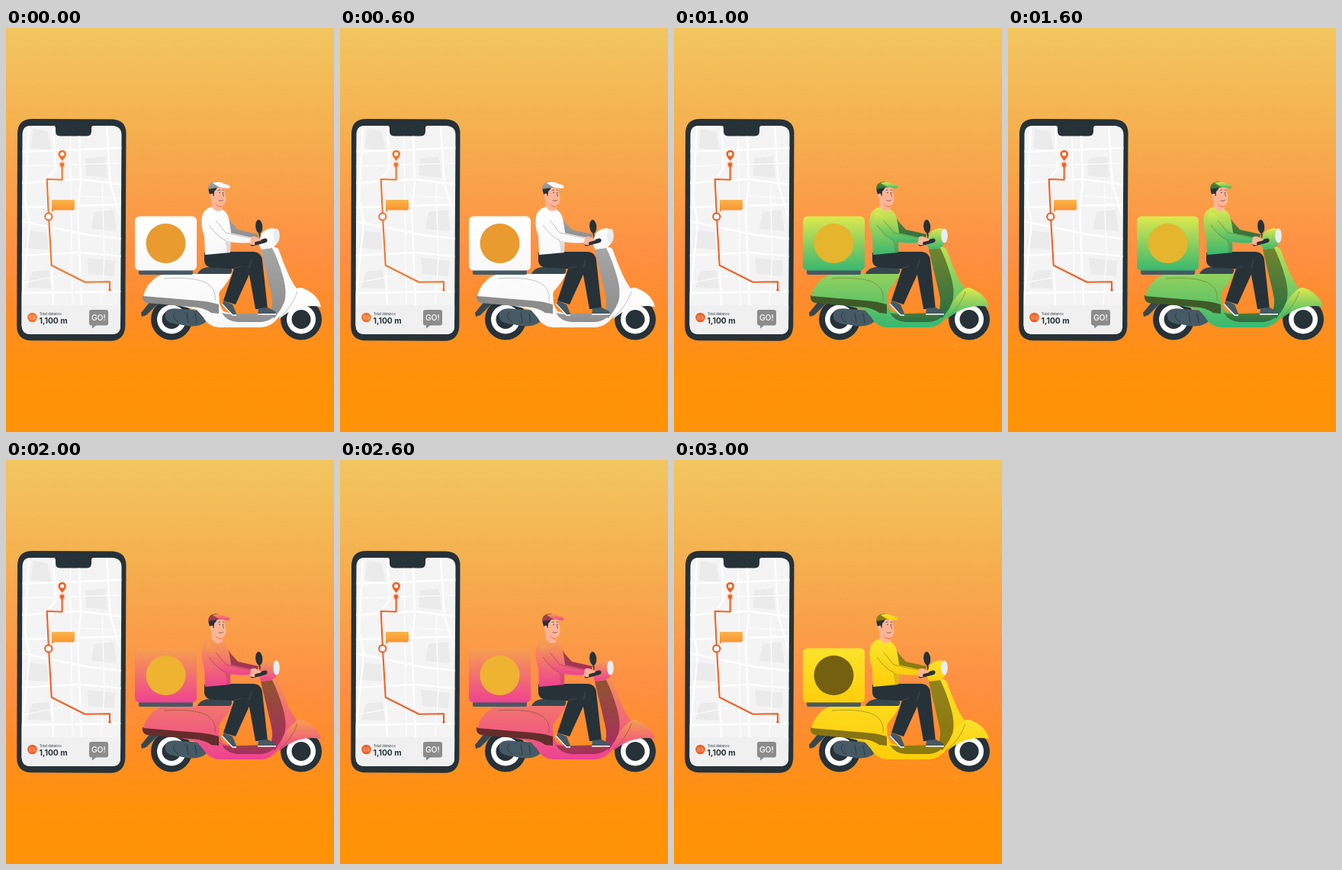
An HTML page that plays this animation: 430x529 px, repeating every 4 s.

```html
<!DOCTYPE html>
<html lang="en">
<head>
<meta charset="utf-8">
<title>Delivery scooter</title>
<style>
html, body { margin: 0; width: 100%; height: 100%; overflow: hidden; }
svg { display: block; width: 100%; height: 100%; font-family: Inter, sans-serif; }
.paint { fill: url(#paint); }
.body { fill: url(#body); }
.shade { fill: url(#shade); }
.edge { fill: none; stroke: var(--shade1); stroke-width: .7; }
.accent { fill: var(--accent); }
.route { fill: none; stroke: var(--accent); stroke-width: 2.1; stroke-linejoin: round; }
.dark { fill: #263238; }
.slate { fill: #455a64; }
.skin { fill: #ffb596; }
.line { fill: none; stroke: #263238; stroke-linecap: round; }
.road { fill: none; stroke: #fff; }
</style>
</head>
<body>
<svg viewBox="0 0 430 529" preserveAspectRatio="none">
  <defs>
    <linearGradient id="sky" x2="0" y2="1">
      <stop stop-color="#f2c65f"/><stop offset=".25" stop-color="#f5b04f"/>
      <stop offset=".55" stop-color="#fe9043"/><stop offset=".68" stop-color="#ff8c2c"/>
      <stop offset=".86" stop-color="#ff9209"/><stop offset="1" stop-color="#ff9305"/>
    </linearGradient>
    <linearGradient id="paint" x2="0" y2="1">
      <stop style="stop-color:var(--top)"/><stop offset="1" style="stop-color:var(--bottom)"/>
    </linearGradient>
    <linearGradient id="body" href="#paint" gradientUnits="userSpaceOnUse" x1="0" y1="262" x2="0" y2="392"/>
    <linearGradient id="shade" x2="0" y2="1">
      <stop style="stop-color:var(--shade1)"/><stop offset="1" style="stop-color:var(--shade2)"/>
    </linearGradient>
    <linearGradient id="tag" x2="0" y2="1">
      <stop stop-color="#f9b54a"/><stop offset="1" stop-color="#fd8d2e"/>
    </linearGradient>
    <clipPath id="screen">
      <path d="M32 128H62Q65 128 65 131V135Q65 141.500 71 141.500H106Q112 141.500 112 135V131Q112 128 115 128H140Q151.500 129 151.500 140L150 390Q150 401 139 401H31Q20.500 400 20.500 389L21.500 139Q22 128 32 128Z"/>
    </clipPath>
    <g id="wheel">
      <circle class="dark" r="27"/>
      <circle r="19" fill="#fff"/>
      <circle class="dark" r="12.5"/>
    </g>
  </defs>

  <rect width="430" height="529" fill="url(#sky)"/>

  <!-- phone -->
  <path class="dark" d="M33 119L139 119.500Q157.500 120.500 157.500 138L156.300 391Q155 409.500 137 409.800L32 409.300Q14.200 408 14.200 390L15 138Q15.500 119.500 33 119Z"/>
  <g clip-path="url(#screen)">
    <path fill="#f4f4f4" d="M14 120H160V410H14Z"/>
    <path fill="#ebebeb" d="M35 132L55 135 60 161 33 157ZM105 171L130 168 133 196 104 193ZM116 241L141 238 145 266 112 263ZM28 265L54 268 55 290 25 288ZM106 301L143 305 142 325 108 322ZM34 319L56 317 59 341 28 340Z"/>
    <path class="road" stroke-width="2.4" d="M20 162L152 157M20 203L98 198 152 205M20 235L152 231M20 253L108 271 152 276M20 298L98 294 152 299M20 347L152 345M62 128L65 184 54 198 60 311 62 363M96 141L98 204 94 235 99 363M30 128L25 225 31 255 20 363M132 128L137 205 149 245"/>
    <path class="road" stroke-width="1.2" d="M20 181L152 177M84 141L87 363M97 220L152 223M126 205L129 300 125 363M20 334L99 319"/>
    <path fill="#f0f0f1" d="M14 363H160V410H14Z"/>
  </g>
  <path class="route" d="M73.600 180V198.800L53.700 198 56 247 59.700 310.800 103.500 332.700 136 332.200V343"/>
  <circle class="accent" cx="73.500" cy="179" r="4.2" opacity=".3"/>
  <circle class="accent" cx="73.500" cy="179" r="2.7"/>
  <circle class="accent" cx="136" cy="343" r="1.8"/>
  <path class="accent" d="M73.700 174Q68.400 168 68.400 165A5.300 5.300 0 0 1 79 165Q79 168 73.700 174Z"/>
  <circle cx="73.700" cy="165" r="2.6" fill="#fff"/>
  <circle class="route" cx="55.800" cy="247" r="4.6" style="fill:#fff"/>
  <path fill="url(#tag)" d="M61 225H88.500Q90 225 90 227V236.500Q90 238.500 88 238.500H63L60 241V226Z"/>
  <circle class="accent" cx="34.500" cy="379" r="6.3"/>
  <path fill="none" stroke="#fff" stroke-width=".5" opacity=".7" d="M31 377H37V381H31ZM37 378.500H38.300V381H37M32 379H35"/>
  <g class="dark">
    <text x="43.700" y="376.300" font-size="4.4">Total distance</text>
    <text x="43.500" y="386.500" font-size="10.300" font-weight="700">1,100 m</text>
  </g>
  <path fill="#8c8c8c" d="M112 369H131Q134 369 134 372V386.500Q134 389.500 131 389.500H118L113 393.500V389.500H112Q109 389.500 109 386.500V372Q109 369 112 369Z"/>
  <text x="121.300" y="383" font-size="10.300" font-weight="500" fill="#fff" text-anchor="middle">GO!</text>

  <!-- wheels and engine -->
  <path fill="#37474f" d="M190 357L177 373 178 378 184 376 199 361Z"/>
  <use href="#wheel" x="217" y="381.500"/>
  <use href="#wheel" x="387" y="381.500"/>
  <path class="slate" d="M211 370Q217 366 229 368L257 370 263 384Q255 392 237 390L227 388Q210 387 209 379Q208 373 211 370Z"/>
  <path class="line" d="M221 373Q216 380 226 385M237 373L239 386M248 374L250 386" stroke-width=".8"/>

  <!-- rear body and floor -->
  <path class="body" d="M186 342Q192 323 212 322H296Q291 333 280 345Q276 358 285 371L300 375H344Q359 371 369 354L382 343 359 376Q350 391 334 392H279Q265 391 258 378L250 369 190 355Z"/>
  <path class="shade" d="M283 373Q291 376 305 374L342 373Q354 371 358 361L360 368Q350 384 334 385H304Q289 384 283 373Z"/>
  <path d="M179 350Q178 358 185 360L252 366Q263 368 269 373L279 374V357L252 352Z" style="fill:var(--strip)"/>
  <path class="body" d="M180 351Q184 334 198 327Q210 322 239 324Q271 327 277 341Q281 350 279 362Q268 358 252 357Z"/>
  <path class="edge" d="M207 328Q251 325 266 336Q276 344 274 357"/>
  <path fill="#37474f" d="M251 322Q254 314 266 313L295 314Q298 318 294 322Z"/>

  <!-- delivery box -->
  <rect class="slate" x="174" y="316" width="71" height="7" rx="2"/>
  <rect class="paint" x="169" y="246.500" width="81" height="71" rx="6"/>
  <circle cx="209.500" cy="282" r="26" style="fill:var(--badge)"/>

  <!-- front shield and fender -->
  <path class="body" d="M338 288Q344 282 357 289Q363 306 370 322Q378 339 384 344Q375 362 353 380Q363 361 358 341Q352 314 338 288Z"/>
  <path class="shade" d="M334 290L349 288Q357 304 363 325Q370 349 363 364L352 380 345 376Q352 363 347 345Z"/>
  <path class="paint" d="M358 381Q360 359 378 344Q383 338 390 341Q409 349 413 365Q397 362 382 367Q370 371 358 381Z"/>
  <path class="edge" d="M382 345Q376 364 358 380"/>

  <!-- far leg, far arm -->
  <path class="dark" d="M287 293L325 293Q335 294 336 304L343 368H327L318 318 287 314Z"/>
  <path class="slate" d="M331 367L343 366 353 371Q355 374 352 375H330Z"/>
  <path fill="#fff" d="M330 374H354V375.500H330Z"/>
  <path class="shade" d="M281 242Q290 245 295 254L304 264 331 270 329 277 301 277 284 264Z"/>

  <!-- handlebar -->
  <path class="line" d="M332 267L334 279" stroke-width="1.700"/>
  <ellipse class="dark" cx="331.700" cy="260" rx="4.500" ry="9" transform="rotate(-5 331.700 260)"/>
  <path class="paint" d="M333 275Q335 264 349 262Q358 263 358 274Q357 284 348 288L335 290Q330 284 333 275Z"/>
  <ellipse cx="354.500" cy="272" rx="4.300" ry="9.500" fill="#e9edf0"/>
  <path class="line" d="M323 283L340 278" stroke-width="5"/>

  <!-- near leg -->
  <path class="dark" d="M260 294L309 293Q324 293 326 301Q327 306 321 318L301 362 285 357 299 315 272 314Q260 313 260 304Z"/>
  <path d="M299 315L308 312M322 303L319 314" fill="none" stroke="#455a64" stroke-width=".700"/>
  <path class="slate" d="M286 357L297 362 302 374Q301 377 297 376L283 362Z"/>
  <path d="M283 361L297 376 302 376" fill="none" stroke="#fff" stroke-width="1.300"/>

  <!-- rider -->
  <path class="skin" d="M269 219L270 235Q275 244 284 239L283 230Z"/>
  <path class="skin" d="M268 209L286 208Q287 214 288.500 222Q289 233 280 233Q272 232 268 222Z"/>
  <path fill="#ef8e74" d="M274 229Q277 233 283 233V235Q276 235 274 229Z"/>
  <path class="dark" d="M265.500 209L277 208.500Q275 213 273 214L272.500 220H269Q265 216 265.500 209Z"/>
  <circle class="skin" cx="269.500" cy="219" r="2.200"/>
  <path class="line" d="M278 212.500L280.500 212M284 212L286 212.500M284 216L285.500 220.500M279 226Q282 227.500 284.500 225.500" stroke-width=".600"/>
  <circle class="dark" cx="280" cy="215.500" r=".7"/>
  <circle class="dark" cx="285" cy="215.500" r=".6"/>
  <path class="shade" d="M265 210Q265 202 275 201L284 203 283 208 266 211Z"/>
  <path class="paint" d="M271 203Q280 200 286 204L293 206Q295 210 290 210L279 208Z"/>
  <path class="paint" d="M270 234Q275 243 284 238Q290 241 292 249L295 267 294 294 261 297 260 273Q254 256 258 243Q262 236 270 234Z"/>
  <path class="shade" d="M277 263L294 274V294L289 295Q291 280 277 263Z" opacity=".3"/>
  <path class="skin" d="M319 275Q324 271 329 274L335 277 333 280 326 284Q320 285 318 280Z"/>
  <path class="line" d="M328 282L340 279" stroke-width="4"/>
  <path class="paint" d="M264 241Q275 243 282 255L293 268 321 274 320 281Q302 283 287 278Q276 273 266 258Q259 248 264 241Z"/>
  <path class="edge" d="M275 252L288 268 320 275M266 258Q277 274 288 278"/>
</svg>
<script>
const keys = ['top', 'bottom', 'shade1', 'shade2', 'strip', 'accent', 'badge'];
const themes = [
  ['#ffffff', '#f8f8f8', '#a6a6a6', '#8d8d8d', '#8c8c8c', '#f3742d', '#e99b2f'],
  ['#dfe94e', '#39b76f', '#72852e', '#286f43', '#3f5a28', '#f15f25', '#e5b62d'],
  ['#f6a04e', '#ee4391', '#8f5430', '#a82c60', '#632d2b', '#f15f25', '#edb331'],
  ['#fae32b', '#fdce0b', '#91831b', '#8b770d', '#877414', '#f15f25', '#75600f']
];
const root = document.documentElement;

function draw() {
  const theme = themes[Math.floor(performance.now() / 1000) % themes.length];
  keys.forEach((key, i) => root.style.setProperty('--' + key, theme[i]));
  requestAnimationFrame(draw);
}
draw();
</script>
</body>
</html>
```
